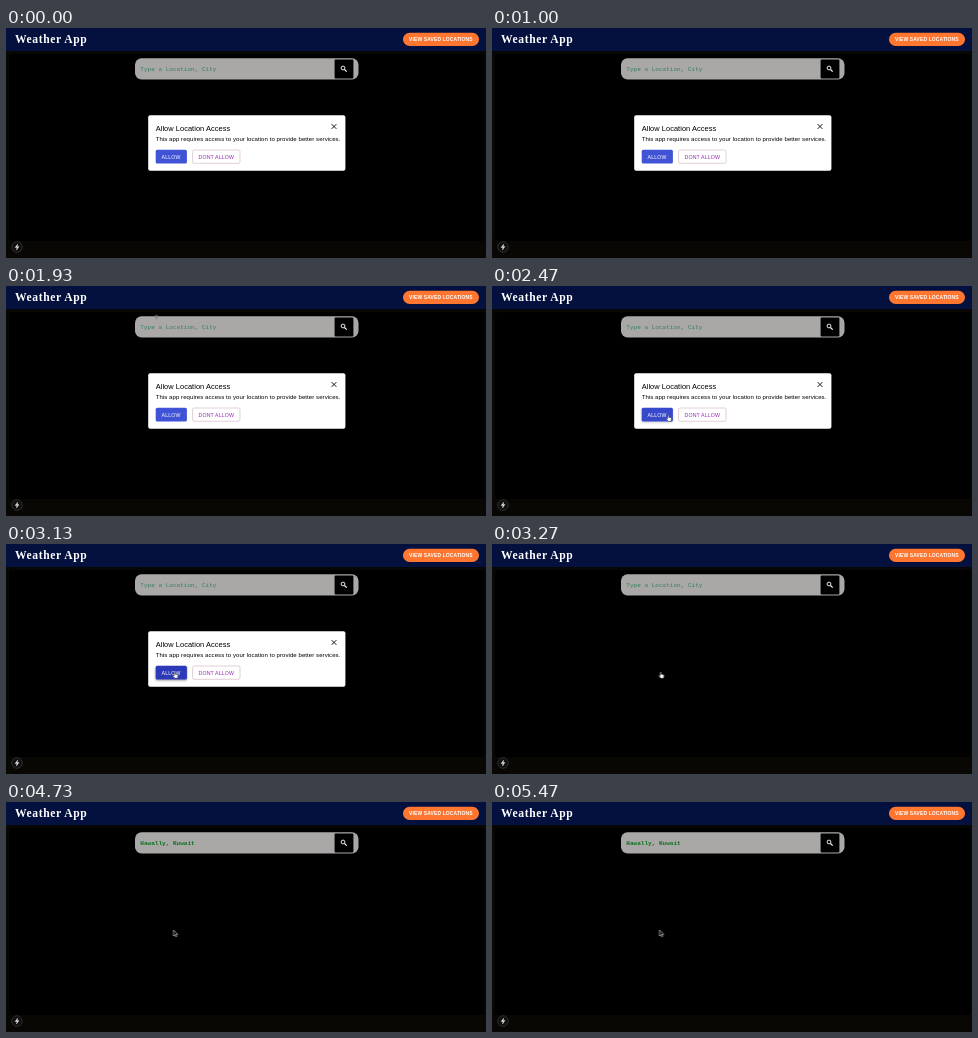
These frames come from a looping animation (480 by 230 pixels, 8 s). An HTML page:

```html
<!DOCTYPE html>
<html lang="en">
<head>
<meta charset="utf-8">
<title>Weather App</title>
<style>
  html, body { margin: 0; width: 100%; height: 100%; overflow: hidden; background: #080703; }
  svg { display: block; width: 480px; height: 230px; }
  text { font-family: "Liberation Sans", Arial, sans-serif; white-space: pre; }
  .title { font: bold 11.6px "Liberation Serif", "Times New Roman", serif; letter-spacing: .6px; fill: #fff; }
  .btn { font-size: 5.22px; letter-spacing: .02857em; }
  .saved { font-size: 4.97px; font-weight: bold; fill: #fff; }
  .field { font: 6.05px "Liberation Mono", "Courier New", monospace; fill: #35805a; }
  .typed { font-weight: bold; fill: #08701c; }

  /* every timeline shares one 8 s loop with hard steps */
  .dialog, .hint, .typed, .badge, .allow, .glow, .cursor, .arrow, .beam, .hand {
    animation: 8s step-end infinite;
  }
  .dialog { animation-name: dialog; }
  .hint { animation-name: hint; }
  .typed { animation-name: typed; }
  .badge { animation-name: badge; }
  .allow { animation-name: allow; }
  .glow { animation-name: glow; }
  .cursor { animation-name: move; }
  .arrow { animation-name: arrow; }
  .beam { animation-name: beam; }
  .hand { animation-name: hand; }

  @keyframes dialog { 0% { opacity: 1 } 40.875%, 100% { opacity: 0 } }
  @keyframes hint { 0% { opacity: 1 } 59.125%, 100% { opacity: 0 } }
  @keyframes typed { 0% { opacity: 0 } 59.125%, 100% { opacity: 1 } }
  @keyframes badge { 0% { opacity: 1 } 60.875% { opacity: .75 } 68.375%, 100% { opacity: 1 } }
  @keyframes allow {
    0% { fill: #4053d6 }
    30.875% { fill: #384acb }
    31.625% { fill: #303fbd }
    39.125%, 100% { fill: #2c39b8 }
  }
  @keyframes glow { 0% { opacity: 0 } 30.875% { opacity: .5 } 37.5%, 100% { opacity: 1 } }
  @keyframes move {
    0% { transform: translate(121px, 19px) }
    22.875% { transform: translate(150px, 35px) }
    24.125% { transform: translate(150.5px, 29.5px) }
    26.625% { transform: translate(152px, 45px) }
    28.375% { transform: translate(165px, 90px) }
    29.125% { transform: translate(175px, 129px) }
    31.625% { transform: translate(170px, 128.5px) }
    37.5%, 100% { transform: translate(167.5px, 128px) }
  }
  @keyframes arrow {
    0% { opacity: 0 }
    21.625% { opacity: 1 }
    24.125% { opacity: 0 }
    26.625% { opacity: 1 }
    29.125% { opacity: 0 }
    44.125%, 100% { opacity: 1 }
  }
  @keyframes beam { 0% { opacity: 0 } 24.125% { opacity: 1 } 26.625%, 100% { opacity: 0 } }
  @keyframes hand { 0% { opacity: 0 } 29.125% { opacity: 1 } 44.125%, 100% { opacity: 0 } }
</style>
</head>
<body>
<svg viewBox="0 0 480 230">
  <defs>
    <filter id="soft" x="-20%" y="-40%" width="140%" height="180%">
      <feGaussianBlur stdDeviation="1.2"/>
    </filter>
  </defs>

  <!-- page -->
  <rect width="480" height="230" fill="#080703"/>
  <rect x="3" y="26" width="475.5" height="187" rx="3"/>
  <rect width="480" height="23" fill="#04103d"/>
  <text class="title" x="9" y="15">Weather App</text>
  <rect x="397" y="4.8" width="76" height="13.2" rx="6.6" fill="#ff7630"/>
  <text class="btn saved" x="403" y="13.3">VIEW SAVED LOCATIONS</text>

  <!-- search -->
  <rect x="129" y="30.3" width="223.5" height="21.2" rx="6.5" fill="#aaa7a7"/>
  <rect x="328.6" y="31.4" width="18.8" height="19" rx="1"/>
  <g fill="none" stroke="#fff">
    <circle cx="337" cy="40" r="1.9" stroke-width=".9"/>
    <path d="M338.5 41.5L340.7 43.7" stroke-width="1.1"/>
  </g>
  <text class="field hint" x="134.3" y="42.7">Type a Location, City</text>
  <text class="field typed" x="134.3" y="42.7">Hawally, Kuwait</text>

  <!-- permission dialog -->
  <g class="dialog">
    <rect x="142.2" y="87.2" width="197.2" height="55.6" rx="2" fill="#fff"/>
    <text x="149.7" y="103.2" font-size="7.43" letter-spacing=".05">Allow Location Access</text>
    <text x="149.7" y="113" font-size="6.05" letter-spacing=".057">This app requires access to your location to provide better services.</text>
    <path d="M325.6 96.1l4.8 4.8m0-4.8l-4.8 4.8" stroke="#000" stroke-width=".9"/>
    <g class="glow">
      <rect x="149.5" y="123" width="31.5" height="13.6" rx="1.5" fill="#000" opacity=".4" filter="url(#soft)"/>
    </g>
    <rect class="allow" x="149.7" y="121.8" width="31.2" height="13.7" rx="1.5"/>
    <text class="btn" x="155.6" y="130.5" fill="#fff">ALLOW</text>
    <rect x="186.6" y="122" width="47.4" height="13.3" rx="1.5" fill="#fff" stroke="#d5bcc8" stroke-width=".7"/>
    <text class="btn" x="192.5" y="130.5" fill="#9128b4">DONT ALLOW</text>
  </g>

  <!-- status badge -->
  <g class="badge">
    <circle cx="11" cy="219" r="5.3" fill="#101010" stroke="#3c3c3c" stroke-width=".7"/>
    <path d="M11.6 216.2L9.2 219.5H11L10.5 221.9L12.9 218.6H11.1Z" fill="#ddd" stroke="#ddd" stroke-width=".5" stroke-linejoin="round"/>
  </g>

  <!-- pointer -->
  <g class="cursor">
    <path class="arrow" d="M0 0V6L1.4 4.8L2.3 6.8L3.3 6.4L2.4 4.4H4.3Z" fill="#080808" stroke="#ddd" stroke-width=".6" stroke-linejoin="round"/>
    <g class="beam" fill="none">
      <path d="M-1.3 .3H1.3" stroke="#ddd" stroke-width=".7"/>
      <path d="M0 .5V3.5" stroke="#333" stroke-width=".6"/>
    </g>
    <path class="hand" d="M.9 0Q1.6 -.3 1.8 .4V2.3L4 2.7Q4.7 2.9 4.5 3.8L4 6.3H1.3L-.6 3.9Q-.6 3.1 .2 3.4L.7 3.8V.4Z" fill="#fff" stroke="#111" stroke-width=".4" stroke-linejoin="round"/>
  </g>
</svg>
</body>
</html>
```
